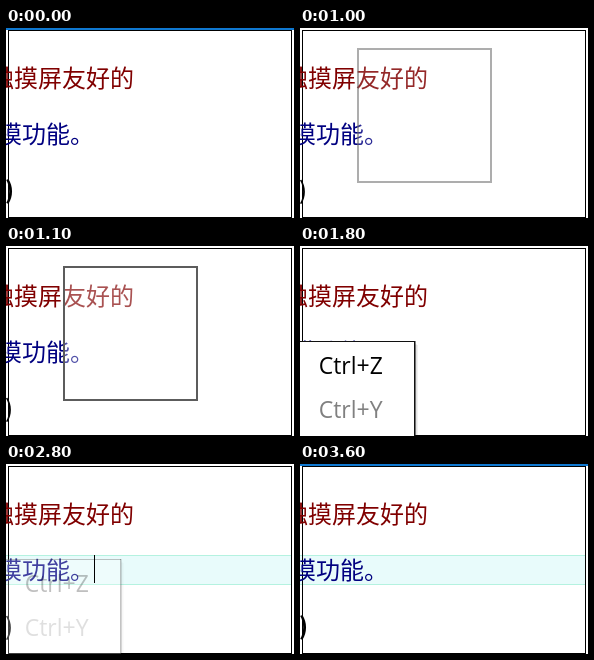
Write an HTML page with a canvas that moves like this. It is 288x190 px and loops after 3.7 s.

```html
<!DOCTYPE html>
<html lang="zh-CN">
<head>
<meta charset="utf-8">
<style>
  html, body { margin: 0; width: 100%; height: 100%; overflow: hidden; background: #fff; }
  canvas { display: block; }
</style>
</head>
<body>
<canvas id="stage" width="288" height="190"></canvas>
<script>
const LOOP = 3700;
const ctx = document.getElementById('stage').getContext('2d');
const CJK = '24px "Noto Sans CJK SC", "Noto Sans CJK", sans-serif';
const LATIN = '23px "Open Sans", sans-serif';

function fill(color, x, y, w, h) {
  ctx.fillStyle = color;
  ctx.fillRect(x, y, w, h);
}

function text(str, x, y, color, font) {
  ctx.font = font;
  ctx.fillStyle = color;
  ctx.fillText(str, x, y);
}

function faded(alpha, draw) {
  ctx.save();
  ctx.globalAlpha = alpha;
  draw();
  ctx.restore();
}

function outline(color, x, y, w, h, line) {
  ctx.strokeStyle = color;
  ctx.lineWidth = line;
  ctx.strokeRect(x + line / 2, y + line / 2, w - line, h - line);
}

// Press-and-hold indicator
function holdSquare() {
  fill('rgba(255,255,255,.32)', 57, 20, 135, 135);
  outline('#5c5c5c', 57, 20, 135, 135, 2);
}

function shrinkingSquares() {
  outline('#f9f9f9', 57, 20, 135, 135, 1);
  fill('rgba(255,255,255,.15)', 79, 42, 90, 90);
  outline('#b4b4b4', 79, 42, 90, 90, 2);
  outline('#b4b4b4', 85, 48, 79, 79, 2);
}

function menu() {
  for (let i = 1; i <= 3; i++) fill('rgba(0,0,0,.06)', 115, 96 + i, i, 94);
  fill('#fff', 0, 95, 115, 95);
  fill('#101010', 0, 95, 115, 1);
  fill('#101010', 114, 95, 1.5, 95);
  text('Ctrl+Z', 18.7, 128, '#000', LATIN);
  text('Ctrl+Y', 18.7, 172, '#808080', LATIN);
}

function draw(t) {
  const active = t < 400 || t >= 3600;
  fill('#fff', 0, 0, 288, 190);
  if (active) fill('#0f78d0', 0, 0, 288, 2);

  if (t >= 2800) {
    fill('#e8fbfb', 0, 91, 285, 30);
    fill('#b4f2e0', 0, 91, 285, 1);
    fill('#b4f2e0', 0, 120, 285, 1);
  }
  outline('#000', 2, 2, 284, 188, 1);

  text('触摸屏友好的', -16, 59, '#800000', CJK);
  text('摸功能。', -8, 115, '#000080', CJK);
  text(')', -1, 171, '#000', (active ? 'bold ' : '') + CJK);

  if (t >= 1000 && t < 1100) faded(.5, holdSquare);
  else if (t >= 1100 && t < 1700) holdSquare();
  else if (t >= 1700 && t < 1800) {
    shrinkingSquares();
    faded(.25, menu);
  } else if (t >= 1800 && t < 2800) menu();
  else if (t >= 2800 && t < 2900) faded(.25, menu);

  if (t >= 2800 && t < 3200) fill('#000', 88, 91, 1, 28);
}

const start = performance.now();
function tick() {
  draw((performance.now() - start) % LOOP);
  requestAnimationFrame(tick);
}
tick();
</script>
</body>
</html>
```
